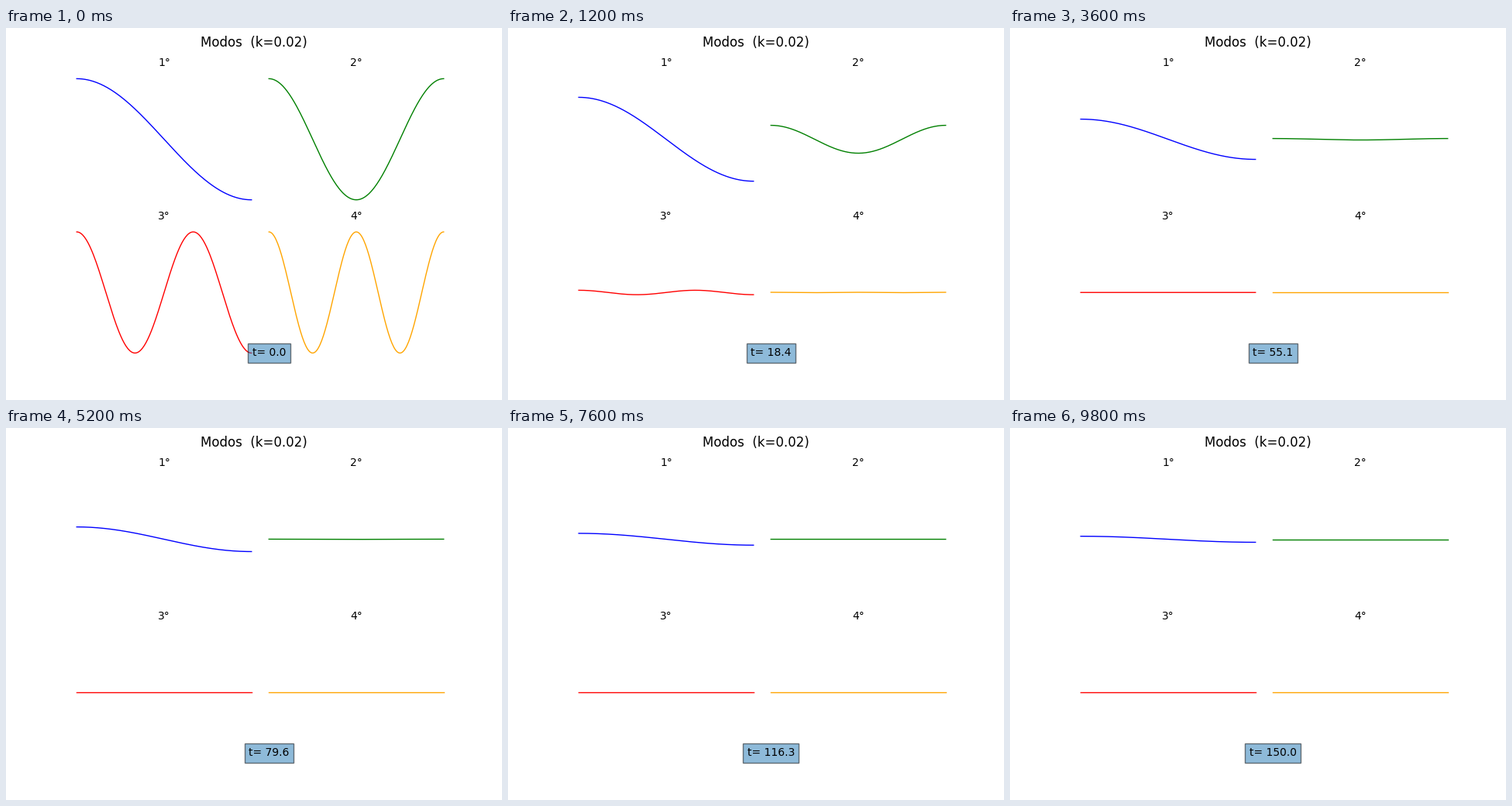
Write a matplotlib script that moves like this. It is 640 by 480 pixels and loops after 10000 ms.

```python
import numpy as np
import matplotlib.pyplot as plt
from matplotlib.animation import FuncAnimation

K = 0.02
FRAMES = 50
COLORS = ["blue", "green", "red", "orange"]

plt.rcParams["font.family"] = "DejaVu Sans"

x = np.linspace(0, np.pi, 200)
times = np.linspace(0, 150, FRAMES)


def mode(n, t):
    """Cosine mode n of the heat equation, decaying at rate K n^2."""
    return np.exp(-K * n**2 * t) * np.cos(n * x)


fig, axes = plt.subplots(2, 2, figsize=(6.4, 4.8), dpi=100)
fig.subplots_adjust(left=0.125, right=0.9, bottom=0.11, top=0.88,
                    wspace=0, hspace=0.15)
fig.suptitle(f"Modos  (k={K})", fontsize=12)

lines = []
for n, (ax, color) in enumerate(zip(axes.flat, COLORS), start=1):
    ax.set_title(f"{n}°", fontsize=10)
    ax.set_xlim(-0.05 * np.pi, 1.05 * np.pi)
    ax.set_ylim(-1.1, 1.1)
    ax.axis("off")
    lines += ax.plot(x, mode(n, 0), color=color, lw=1)

clock = axes[1, 1].text(0, -1, "", fontsize=10, ha="center", va="center",
                        bbox=dict(facecolor="tab:blue", alpha=0.5))


def update(i):
    t = times[i]
    for n, line in enumerate(lines, start=1):
        line.set_ydata(mode(n, t))
    clock.set_text(f"t= {t:.1f}")
    return [*lines, clock]


anim = FuncAnimation(fig, update, frames=FRAMES, interval=200,
                     init_func=lambda: update(0), repeat=True, repeat_delay=0)
plt.show()
```
